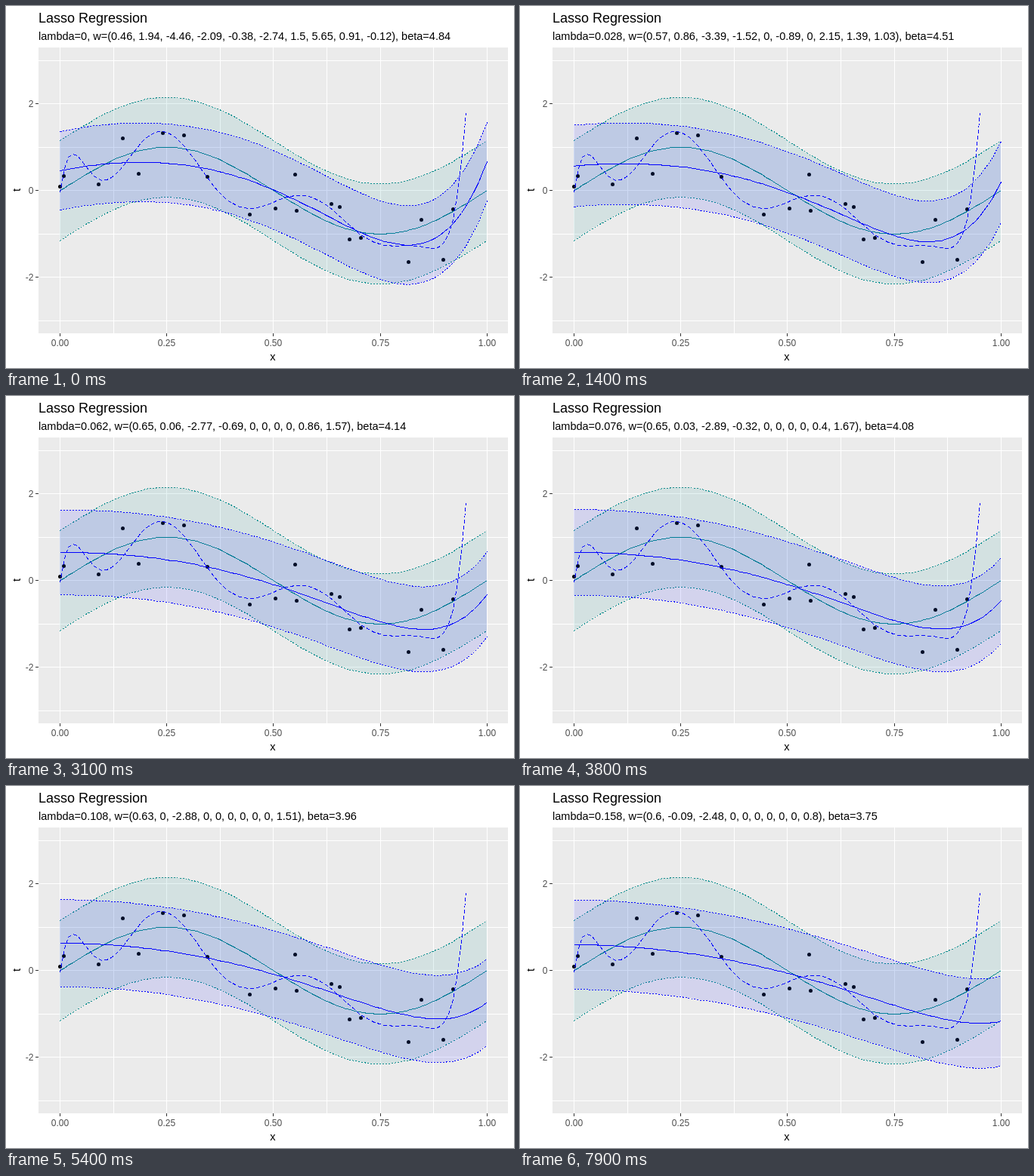
Recreate the animation shown at these times as an HTML page. Size 672 by 480 pixels, loop 8000 ms.

```html
<!DOCTYPE html>
<html lang="en">
<head>
<meta charset="utf-8">
<title>Lasso Regression</title>
<style>
  html, body { margin: 0; width: 100%; height: 100%; overflow: hidden; background: #fff; }
  svg { display: block; width: 672px; height: 480px; font-family: "Liberation Sans", Arial, sans-serif; }
  line, polyline, polygon, rect { shape-rendering: crispEdges; }
  polyline { fill: none; }
  .tick { font-size: 12px; fill: #4d4d4d; }
  .label { font-size: 14.52px; }
</style>
</head>
<body>
<svg id="plot" viewBox="0 0 672 480"></svg>
<script>
const STEP = 100, STEPS = 80;
const TEAL = '#008b8b', BLUE = '#0000ff';
const DOTTED = '2 2', DASHED = '5 3';
const svg = document.getElementById('plot');

// The lasso path is piecewise linear between these times (ms);
// a weight whose list ends early has shrunk to zero.
const knots = [0, 1400, 3100, 4400, 7200, 7900];
const weights = [
  [0.46, 0.57, 0.65, 0.65, 0.6, 0.6],
  [1.94, 0.86, 0.06, 0, 0, -0.09],
  [-4.46, -3.39, -2.77, -2.99, -2.67, -2.48],
  [-2.09, -1.52, -0.69],
  [-0.38],
  [-2.74, -0.89],
  [1.5],
  [5.65, 2.15],
  [0.91, 1.39, 0.86],
  [-0.12, 1.03, 1.57, 1.76, 1.06, 0.8]
];
const precision = [4.84, 4.51, 4.14, 4.02, 3.84, 3.75];

// Observations in stage pixels.
const dots = [
  [71, 239], [76, 225], [122, 236], [154, 175], [175, 222], [207, 168], [235, 171],
  [266, 226], [322, 276], [356, 268], [382, 223], [384, 271], [430, 262], [441, 266],
  [454, 309], [469, 307], [532, 339], [549, 283], [578, 336], [591, 269]
];

// The overfit is the degree 9 polynomial with these heights at Chebyshev nodes on [0, END].
const END = 0.95;
const overfit = [-0.04, 0.84, 0.25, 1.37, -0.22, -0.11, -1.07, -1.29, -0.61, 1.79];

const px = x => 71 + 564.9 * x;
const py = y => 244.3 - 57.42 * y;
const snap = v => Math.round(v) + 0.5;
const xs = Array.from({ length: 101 }, (_, i) => i / 100);

function add(tag, attrs, text) {
  const el = document.createElementNS('http://www.w3.org/2000/svg', tag);
  for (const k in attrs) el.setAttribute(k, attrs[k]);
  if (text !== undefined) el.textContent = text;
  svg.appendChild(el);
  return el;
}

const line = (x1, y1, x2, y2, stroke) => add('line', { x1, y1, x2, y2, stroke });
const curve = (stroke, dash = 'none') => add('polyline', { stroke, 'stroke-dasharray': dash });
const trace = (f, at = xs) => at.map(x => [snap(px(x)), snap(py(f(x)))]);
const setPoints = (el, pts) => el.setAttribute('points', pts.map(p => p.join()).join(' '));

// A filled band with dotted edges and a solid centre line.
function makeBand(color) {
  const area = add('polygon', { fill: color, 'fill-opacity': 0.1, transform: 'translate(-0.5 -0.5)' });
  const mid = curve(color), low = curve(color, DOTTED), high = curve(color, DOTTED);
  return (f, beta) => {
    const half = 2 / Math.sqrt(beta);
    const bottom = trace(x => f(x) - half), top = trace(x => f(x) + half);
    setPoints(mid, trace(f));
    setPoints(low, bottom);
    setPoints(high, top);
    setPoints(area, top.concat(bottom.reverse()));
  };
}

// Barycentric interpolation through the Chebyshev nodes.
function overfitAt(x) {
  const last = overfit.length - 1;
  let top = 0, bottom = 0;
  for (let k = 0; k <= last; k++) {
    const gap = x - END * (1 - Math.cos(Math.PI * k / last)) / 2;
    if (Math.abs(gap) < 1e-9) return overfit[k];
    const share = (k % 2 ? -1 : 1) * (k % last ? 1 : 0.5) / gap;
    top += share * overfit[k];
    bottom += share;
  }
  return top / bottom;
}

function drawAxes() {
  add('rect', { x: 43, y: 55, width: 621, height: 379, fill: '#ebebeb' });
  for (let i = 0; i <= 8; i++) {
    const x = snap(px(i / 8));
    line(x, 55, x, 434, '#fff');
    if (i % 2) continue;
    line(x, 434, x, 438, '#333');
    add('text', { class: 'tick', x, y: 451, 'text-anchor': 'middle' }, (i / 8).toFixed(2));
  }
  for (let i = -3; i <= 3; i++) {
    const y = snap(py(i));
    line(43, y, 664, y, '#fff');
    if (i % 2) continue;
    line(39, y, 43, y, '#333');
    add('text', { class: 'tick', x: 36.5, y: y + 4.5, 'text-anchor': 'end' }, i);
  }
  add('text', { x: 43, y: 22, 'font-size': 18 }, 'Lasso Regression');
  add('text', { class: 'label', x: 353, y: 470, 'text-anchor': 'middle' }, 'x');
  add('text', { class: 'label', transform: 'translate(19 244) rotate(-90)', 'text-anchor': 'middle' }, 't');
}

drawAxes();
const subtitle = add('text', { class: 'label', x: 43, y: 45 }, '');
for (const [x, y] of dots) add('circle', { cx: x + 0.5, cy: y + 0.5, r: 2.5 });
makeBand(TEAL)(x => Math.sin(2 * Math.PI * x), 3);
const drawFit = makeBand(BLUE);
setPoints(curve(BLUE, DASHED), trace(overfitAt, xs.filter(x => x <= END)));

function modelAt(ms) {
  const i = Math.max(knots.findIndex(t => t >= ms), 1);
  const u = (ms - knots[i - 1]) / (knots[i] - knots[i - 1]);
  const mix = (values) => (values[i - 1] || 0) * (1 - u) + (values[i] || 0) * u;
  return { w: weights.map(mix), beta: mix(precision) };
}

const round = (v, digits) => String(+v.toFixed(digits));

let shown = -1;
function render(ms) {
  const step = Math.floor(ms / STEP) % STEPS;
  if (step === shown) return;
  shown = step;
  const { w, beta } = modelAt(step * STEP);
  drawFit(x => w.reduceRight((sum, c) => sum * x + c, 0), beta);
  subtitle.textContent = `lambda=${round(step * 0.002, 3)}, ` +
    `w=(${w.map(v => round(v, 2)).join(', ')}), beta=${round(beta, 2)}`;
}

const start = performance.now();
function tick() {
  render(performance.now() - start);
  requestAnimationFrame(tick);
}
tick();
</script>
</body>
</html>
```
